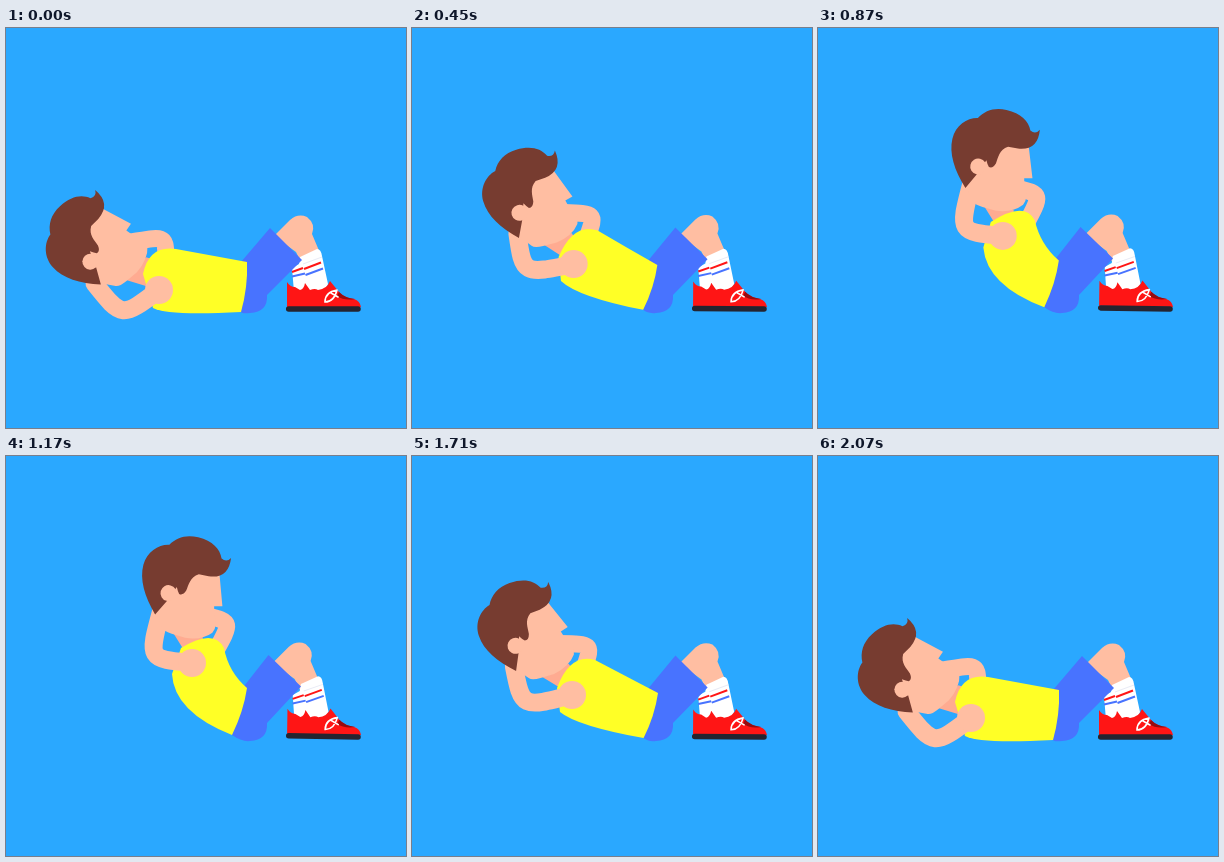
Animation of 400x400 px, one loop 2250 ms. Source, as an HTML page with a canvas:

```html
<!DOCTYPE html>
<html lang="en">
<head>
<meta charset="utf-8">
<title>Sit-ups</title>
<style>
  html, body { margin: 0; width: 100%; height: 100%; overflow: hidden; background: #2aa8ff; }
  canvas { display: block; width: 100vw; height: 100vh; }
</style>
</head>
<body>
<canvas id="stage"></canvas>
<script>
const SIZE = 400, LOOP = 2250, TICK = 30;
const canvas = document.getElementById('stage');
const ctx = canvas.getContext('2d');
const dpr = window.devicePixelRatio || 1;
canvas.width = canvas.height = SIZE * dpr;

const COLOR = {
  sky: '#2aa8ff', skin: '#ffbea2', neck: '#ffab91', hair: '#773c30', shirt: '#ffff26',
  shorts: '#4873ff', red: '#ff1515', dark: '#980b10', sole: '#252430', white: '#fff'
};

// Lift (0 lying, 1 up), then: ear x y, head angle, shoulder, elbow, far elbow,
// collar back, collar curve, collar front, waist, lower back, back curve.
const POSES = [
  [0,    84, 234, -42,   153, 262, 116, 290, 159, 208, 137, 246, 143, 217, 170, 221, 241, 234, 147, 280, 162, 288],
  [.129, 90, 219, -32,   155, 254, 118, 277, 165, 203, 142, 243, 152, 211, 173, 216, 244, 235, 147, 271, 158, 281],
  [.377, 103, 190, -18.7, 160, 239, 110, 252, 180, 188, 145, 232, 158, 197, 183, 204, 246, 237, 148, 256, 165, 270],
  [.757, 138, 154, 0,    175, 216, 128, 211, 210, 171, 160, 206, 192, 176, 205, 195, 238, 235, 158, 232, 172, 266],
  [.838, 149, 145, 6.3,  179, 212, 134, 209, 215, 168, 163, 203, 198, 174, 211, 193, 240, 235, 162, 226, 172, 264],
  [1,    162, 137, 14.8, 186, 207, 142, 203, 226, 166, 175, 192, 208, 172, 218, 192, 241, 232, 166, 218, 168, 256]
];

const FACE = new Path2D('M-7 22L3 35Q5 38 14 38.5L28 39Q45 37 53 27Q57 18 50 9L48 1L56 -1L44 -34L10 -40L-10 0Z');
const HAIR = new Path2D('M-7 24C-22 9 -31 -6 -31 -21C-31 -35 -21 -45 -11 -47C-6 -56 3 -61.5 15 -61.5' +
  'C30 -61.5 39 -56 43 -47Q49 -44 52 -50Q55 -29 35 -26.5L25 -26C17 -21 18 -13 17 -7Q15 -1 11 -2Q9 -4 7 -8L1 8Z');
const CALF = new Path2D('M268 208L284 192Q292 185 301 189Q310 196 306 206L314 225L296 236L290 224Z');
const SOCKS = new Path2D('M294 229L311 221Q315 221 316 228L322 256L318 264L288 264L286 240L293 236Z');
const SHOE = new Path2D('M281 279L281 254Q284 259 289 259L294 262Q298 261 299 255L304 262' +
  'Q309 260 312 262Q321 261 324 253L333 264Q338 270 348 271Q354 273 355 279Z');
const PATCH = new Path2D('M333 264L331 268Q338 273 349 271Q339 270 333 264Z');

const clamp = x => Math.max(0, Math.min(1, x));
const ease = x => (1 - Math.cos(Math.PI * clamp(x))) / 2;
const lift = ms => ms < 1100 ? ease((ms - 15) / 960) : 1 - ease((ms - 1215) / 855);

function fill(shape, color) {
  ctx.fillStyle = color;
  ctx.fill(shape);
}

function line(color, width, ...pts) {
  ctx.strokeStyle = color;
  ctx.lineWidth = width;
  ctx.beginPath();
  for (let i = 0; i < pts.length; i += 2) ctx.lineTo(pts[i], pts[i + 1]);
  ctx.stroke();
}

function limb(from, bend, to, width) {
  ctx.strokeStyle = COLOR.skin;
  ctx.lineWidth = width;
  ctx.lineCap = 'round';
  ctx.beginPath();
  ctx.moveTo(...from);
  ctx.bezierCurveTo(...bend, ...bend, ...to);
  ctx.stroke();
}

function disc(x, y, r, color) {
  ctx.fillStyle = color;
  ctx.beginPath();
  ctx.arc(x, y, r, 0, Math.PI * 2);
  ctx.fill();
}

// Smooth curve through the poses.
function poseAt(u) {
  const last = POSES.length - 1;
  let i = 0;
  while (i < last - 1 && u > POSES[i + 1][0]) i++;
  const a = POSES[i], b = POSES[i + 1];
  const before = POSES[Math.max(0, i - 1)], after = POSES[Math.min(last, i + 2)];
  const span = b[0] - a[0], s = (u - a[0]) / span;
  return a.map((v, k) => {
    const ma = (b[k] - before[k]) / (b[0] - before[0]) * span;
    const mb = (after[k] - v) / (after[0] - a[0]) * span;
    const d = b[k] - v;
    return v + s * (ma + s * (3 * d - 2 * ma - mb + s * (ma + mb - 2 * d)));
  });
}

function drawLegs(u, hip) {
  ctx.save();
  ctx.translate(-1.4 * u, -u);
  fill(CALF, COLOR.skin);
  ctx.restore();

  ctx.save();
  ctx.translate(354, 284);
  ctx.rotate(.016 * u);
  ctx.translate(-354, -284);
  ctx.lineCap = 'butt';
  fill(SOCKS, COLOR.white);
  line('#e9ebf5', 1, 297, 236, 316, 229);
  line(COLOR.red, 2, 286, 244, 297, 240);
  line(COLOR.shorts, 2, 286, 248.5, 299, 245.5);
  line(COLOR.red, 2, 298, 241, 315, 234.5);
  line(COLOR.shorts, 2, 299.5, 247, 317, 240.5);
  fill(SHOE, COLOR.red);
  fill(PATCH, COLOR.dark);
  ctx.lineCap = 'round';
  line(COLOR.sole, 5.5, 282.7, 281, 352, 281);
  ctx.strokeStyle = COLOR.white;
  ctx.lineWidth = 1.6;
  ctx.stroke(new Path2D('M331 262Q319 264 319 274Q328 274 331 262M325 265L332 269'));
  ctx.restore();

  ctx.fillStyle = COLOR.shorts;
  ctx.beginPath();
  ctx.moveTo(264 - 1.5 * u, 200 - u);
  ctx.lineTo(296 - u, 232 - 1.5 * u);
  ctx.lineTo(261, 267);
  ctx.quadraticCurveTo(262, 284, 244, 285);
  ctx.quadraticCurveTo(236, 286, ...hip);
  ctx.lineTo(235, 234);
  ctx.fill();
}

function draw(ms) {
  const u = lift(ms);
  const p = poseAt(u);
  const [ear, shoulder, elbow, farElbow, nape, collar, chest, waist, back, curve] =
    [1, 4, 6, 8, 10, 12, 14, 16, 18, 20].map(k => [p[k], p[k + 1]]);
  const turn = p[3] * Math.PI / 180, cos = Math.cos(turn), sin = Math.sin(turn);
  const onHead = (x, y) => [ear[0] + x * cos - y * sin, ear[1] + x * sin + y * cos];
  const hip = [235 - 9 * u, 284 - 5 * u];

  ctx.setTransform(dpr, 0, 0, dpr, 0, 0);
  ctx.fillStyle = COLOR.sky;
  ctx.fillRect(0, 0, SIZE, SIZE);

  drawLegs(u, hip);
  limb([chest[0] - 10, chest[1] + 6], farElbow, onHead(43, 12), 17);

  ctx.fillStyle = COLOR.neck;
  ctx.beginPath();
  ctx.moveTo(...onHead(14, 36));
  ctx.lineTo(...onHead(45, 34));
  ctx.lineTo((nape[0] + chest[0]) / 2, (nape[1] + chest[1]) / 2);
  ctx.lineTo(...shoulder);
  ctx.fill();

  const bend = clamp((u - .4) / .6);
  ctx.fillStyle = COLOR.shirt;
  ctx.beginPath();
  ctx.moveTo(...nape);
  ctx.quadraticCurveTo(...collar, ...chest);
  ctx.quadraticCurveTo((chest[0] + waist[0]) / 2 - 7 * bend, (chest[1] + waist[1]) / 2 + 4 * bend, ...waist);
  ctx.quadraticCurveTo((waist[0] + hip[0]) / 2 + 4, (waist[1] + hip[1]) / 2, ...hip);
  ctx.quadraticCurveTo(...curve, ...back);
  ctx.fill();

  limb(shoulder, elbow, onHead(9 * u - 11, 19), 18);
  disc(...shoulder, 14, COLOR.skin);

  ctx.translate(...ear);
  ctx.rotate(turn);
  fill(FACE, COLOR.skin);
  fill(HAIR, COLOR.hair);
  disc(.5, 0, 8, COLOR.skin);
}

function frame() {
  const ms = performance.now() % LOOP;
  draw(Math.floor(ms / TICK) * TICK);
  requestAnimationFrame(frame);
}
frame();
</script>
</body>
</html>
```
